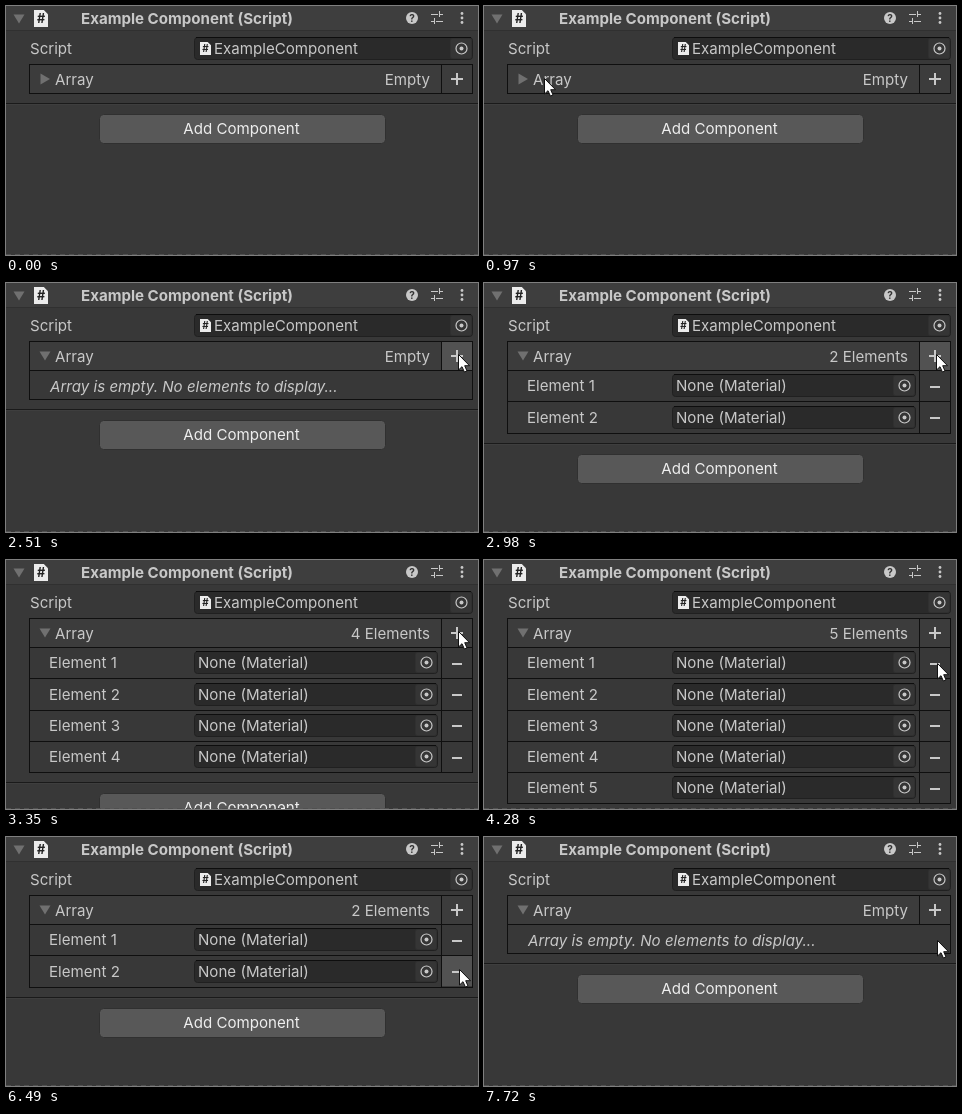
An HTML page with a canvas for the animation above (8 s loop, 472 by 249 pixels).

```html
<!DOCTYPE html>
<html lang="en">
<head>
<meta charset="utf-8">
<title>Array inspector</title>
<style>
html, body { margin: 0; width: 100%; height: 100%; overflow: hidden; background: #383838; }
canvas { display: block; }
</style>
</head>
<body>
<canvas id="stage" width="472" height="249"></canvas>
<script>
const c = document.getElementById('stage').getContext('2d');
const LOOP = 8000, OPEN_PRESS = 1110, OPEN = 1210;
const INK = '#c8c8c8', LINE = '#0f0f0f', LIT = '#525252', ROW = 31.25;

// pointer moves: start time, end time, x, y
const moves = [
  [540, 540, 164, 212], [540, 970, 60, 72],
  [1230, 1550, 166, 94], [1550, 1890, 467, 81],
  [2080, 2080, 465, 80], [2080, 2270, 452, 71]
];

// five presses on plus, then one on the minus of rows 1, 2, 3, 2, 1
const clicks = [];
for (let i = 0; i < 5; i++) {
  const up = 2560 + 263 * i;
  clicks.push({ down: up - 130, up, row: 0, step: 1 });
}
[140, 140, 140, 410, 140].forEach((hold, i) => {
  const up = 4440 + 820 * i, row = 3 - Math.abs(i - 2), arrive = 4090 + 800 * i;
  clicks.push({ down: up - hold, up, row, step: -1 });
  moves.push([arrive - 270, arrive, 453, 74 + 29 * row]);
});

function rect(x, y, w, h, fill) {
  c.fillStyle = fill;
  c.fillRect(x, y, w, h);
}

function round(x, y, w, h, r, fill, stroke) {
  c.beginPath();
  c.roundRect(x + .5, y + .5, w - 1, h - 1, r);
  c.fillStyle = fill;
  c.fill();
  c.strokeStyle = stroke;
  c.lineWidth = 1;
  c.stroke();
}

function text(s, x, y, align = 'left', style = '', fill = INK) {
  c.font = style + ' 15.1px Inter, sans-serif';
  c.textAlign = align;
  c.fillStyle = fill;
  c.fillText(s, x, y);
}

function poly(points, fill) {
  c.beginPath();
  points.forEach(([x, y]) => c.lineTo(x, y));
  c.closePath();
  c.fillStyle = fill;
  c.fill();
}

function disc(x, y, r, fill) {
  c.beginPath();
  c.arc(x, y, r, 0, 7);
  c.fillStyle = fill;
  c.fill();
}

function foldout(x, y, open) {
  poly(open ? [[x - 5.5, y - 4.5], [x + 5.5, y - 4.5], [x, y + 4.5]]
            : [[x - 4.5, y - 5.5], [x + 5, y], [x - 4.5, y + 5.5]], '#707070');
}

function scriptIcon(x, y, w, h) {
  const k = w * .3;
  poly([[x, y], [x + w - k, y], [x + w, y + k], [x + w, y + h], [x, y + h]], '#ececec');
  c.font = `bold ${w * .9}px Inter, sans-serif`;
  c.textAlign = 'center';
  c.fillStyle = '#222';
  c.fillText('#', x + w / 2, y + h * .78);
}

function field(y, right, label, x) {
  round(188, y, right - 188, 23, 3, '#2a2a2a', '#202020');
  rect(190, y, right - 192, 1, '#0d0d0d');
  round(right - 23, y + 1, 22, 21, 2, '#353535', '#303030');
  c.beginPath();
  c.arc(right - 11.5, y + 11.5, 5.5, 0, 7);
  c.strokeStyle = INK;
  c.lineWidth = 1.2;
  c.stroke();
  disc(right - 11.5, y + 11.5, 2, INK);
  text(label, x, y + 17);
}

function titleBar() {
  rect(0, 0, 472, 25, '#3e3e3e');
  rect(0, 24, 472, 1, '#303030');
  foldout(13, 13, true);
  scriptIcon(28, 4, 14, 17);
  text('Example Component (Script)', 75, 18, 'left', '700');
  disc(406, 12, 6, INK);
  c.font = 'bold 10px Inter, sans-serif';
  c.textAlign = 'center';
  c.fillStyle = '#333';
  c.fillText('?', 406, 15.7);
  // two slider tracks, each cut by its knob
  rect(425, 8, 7, 1, INK);
  rect(433, 5, 1, 6, INK);
  rect(434, 8, 3, 1, INK);
  rect(425, 15, 3, 1, INK);
  rect(428, 12, 1, 6, INK);
  rect(430, 15, 7, 1, INK);
  for (let i = -1; i < 2; i++) disc(456, 12 + 4.5 * i, 1.4, INK);
}

function arrayBox(t, count) {
  const open = t >= OPEN;
  const press = clicks.find(k => t >= k.down && t < k.up);
  const lit = press ? press.row : -1;
  const rowTop = i => Math.round(88 + ROW * i);
  const bottom = !open ? 88 : count ? rowTop(count) : 117;

  rect(23, 58, 444, bottom - 58, '#383838');
  rect(23, 58, 444, 30, '#3c3c3c');
  if (t >= OPEN_PRESS && !open) rect(24, 59, 411, 28, LIT);
  if (lit === 0) rect(436, 59, 30, 28, LIT);
  foldout(39, 73, open);
  text('Array', 49, 79);
  const label = count ? count + (count > 1 ? ' Elements' : ' Element') : 'Empty';
  text(label, 424, 79, 'right');
  rect(445, 72, 12, 2, INK);
  rect(450, 67, 2, 12, INK);

  if (open && !count) text('Array is empty. No elements to display...', 44, 109, 'left', 'italic');
  for (let i = 0; i < count; i++) {
    const y = Math.ceil(88 + ROW * i);
    if (lit === i + 1) rect(436, rowTop(i), 30, 30, LIT);
    text('Element ' + (i + 1), 43, y + 20);
    field(y + 3, 432, 'None (Material)', 192);
    rect(446, Math.floor(103.25 + ROW * i), 10, 2, INK);
    rect(23, rowTop(i + 1) - 1, 444, 1, LINE);
  }

  rect(23, 87, 444, 1, LINE);
  rect(435, 58, 1, (count ? bottom : 88) - 58, LINE);
  c.strokeStyle = LINE;
  c.lineWidth = 1;
  c.strokeRect(23.5, 58.5, 443, bottom - 59);
  return bottom;
}

function footer(y) {
  rect(0, y, 472, 1, '#1a1a1a');
  rect(0, y + 1, 472, 1, '#3e3e3e');
  round(93, y + 11, 287, 30, 4, '#585858', '#303030');
  text('Add Component', 235.5, y + 31, 'center', '', '#eee');
  for (let x = 0; x < 472; x += 9) rect(x, 248, 5, 1, '#505050');
}

function pointer(t) {
  // off the stage before it enters, and while past the right edge
  if (t < 540 || (t >= 1940 && t < 2080)) return;
  let x = 0, y = 0;
  for (const [start, end, toX, toY] of moves) {
    if (t < start) break;
    const k = end > start ? Math.min(1, (t - start) / (end - start)) : 1;
    x += (toX - x) * k;
    y += (toY - y) * k;
  }
  c.save();
  c.translate(x, y);
  poly([[.5, .5], [.5, 16], [4, 12.7], [6.4, 18], [9, 17], [6.7, 11.7], [11.5, 11.7]], '#fff');
  c.strokeStyle = '#111';
  c.lineWidth = 1;
  c.stroke();
  c.restore();
}

function draw(now) {
  const t = now % LOOP;
  const count = clicks.reduce((n, k) => t < k.up ? n : n + k.step, 0);
  rect(0, 0, 472, 249, '#383838');
  titleBar();
  text('Script', 24, 48);
  field(31, 467, 'ExampleComponent', 208);
  scriptIcon(194, 36, 11, 13);
  footer(arrayBox(t, count) + 9);
  pointer(t);
  requestAnimationFrame(draw);
}
requestAnimationFrame(draw);
</script>
</body>
</html>
```
